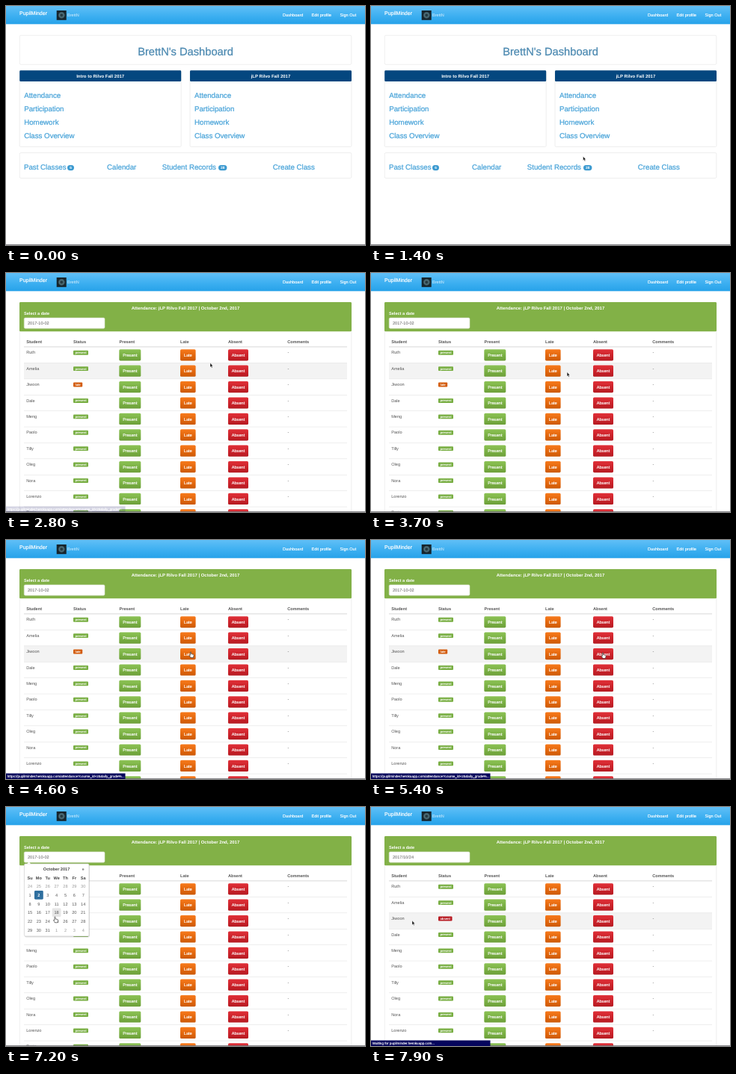
Write an HTML page that moves like this. It is 480x320 px and loops after 8 s.

```html
<!DOCTYPE html>
<html lang="en">
<head>
<meta charset="utf-8">
<title>Class dashboard</title>
<style>
  html, body { margin: 0; width: 100%; height: 100%; overflow: hidden; background: #fff; }
  svg { display: block; width: 100vw; height: 100vh; text-rendering: geometricPrecision;
        font-family: "Liberation Sans", Arial, sans-serif; }
</style>
</head>
<body>
<svg id="stage" viewBox="0 0 480 320"></svg>
<script>
const LOOP = 8000, STEP = 100;
const APP = "PupilMinder", USER = "BrettN", COURSE = "jLP Rilvo Fall 2017";
const HOST = "pupilminder.herokuapp.com";
const STUDENTS = ["Ruth", "Amelia", "Jiwoon", "Dale", "Meng", "Paolo", "Tilly", "Oleg", "Nora", "Lorenzo", "Dario"];
const ROW_TOP = 99, ROW_H = 21.4;
const STATUS_COLORS = { present: "#78ae42", late: "#d35c0d", absent: "#b81b23" };
const BUTTONS = [["Present", 151.3, 29, "green"], ["Late", 233, 20.6, "orange"], ["Absent", 297, 27, "red"]];

// Cursor path: time, x, y of the tip
const PATH = [
  [1000, 300, 326], [1700, 273, 120.6], [3300, 273, 120.6], [4200, 247, 150], [4800, 247, 150],
  [5200, 310, 151], [5600, 310, 151], [6100, 143, 71], [6400, 100, 67], [6600, 100, 67],
  [7200, 65.5, 147.3], [7500, 55, 152.3]
];

const rect = (x, y, w, h, fill, more = "") =>
  `<rect x="${x}" y="${y}" width="${w}" height="${h}" fill="${fill}" ${more}/>`;

const box = (x, y, w, h, fill = "#fff", stroke = "#e2e2e2") =>
  rect(x, y, w, h, fill, `rx="1.6" stroke="${stroke}" stroke-width=".6"`);

// weight thickens the strokes slightly, giving a medium face
function text(str, x, y, size, fill, { anchor = "start", bold = false, weight = 0, more = "" } = {}) {
  return `<text x="${x}" y="${y}" font-size="${size}" fill="${fill}" text-anchor="${anchor}"
    ${bold ? 'font-weight="bold"' : ""} ${weight ? `stroke="${fill}" stroke-width="${weight}"` : ""} ${more}>${str}</text>`;
}

const gradient = (id, ...colors) =>
  `<linearGradient id="${id}" x2="0" y2="1">${colors.map((c, i) =>
    `<stop offset="${[0, .6, 1][i]}" stop-color="${c}"/>`).join("")}</linearGradient>`;

const DEFS = "<defs>" +
  gradient("nav", "#60bff7", "#3aaef0", "#27a2e9") +
  gradient("green", "#8cc255", "#78ae42", "#6d9f3a") +
  gradient("orange", "#f77a1c", "#e0650c", "#cc5a08") +
  gradient("red", "#e03038", "#c92129", "#b51b22") +
  `<radialGradient id="photo"><stop offset=".2" stop-color="#23363d"/><stop offset=".6" stop-color="#52747e"/>
   <stop offset="1" stop-color="#16242b"/></radialGradient></defs>`;

function navbar() {
  const item = (str, x) => text(str, x, 14.2, 5.6, "#fff", { weight: .15 });
  return rect(0, 0, 480, 24.3, "url(#nav)") +
    text(APP, 18, 12.2, 7, "#fff", { weight: .2 }) +
    rect(67.7, 6, 13, 12.8, "#16242b") + `<circle cx="74.3" cy="12.3" r="5" fill="url(#photo)"/>` +
    text(USER, 82, 14.2, 5.6, "#d9effc") +
    item("Dashboard", 370) + item("Edit profile", 408.5) + item("Sign Out", 446.5);
}

function dashboard(linkHovered) {
  const link = (str, x, y, hot) => text(str, x, y, 9.7, hot ? "#17659c" : "#46a2d8",
    { weight: .22, more: hot ? 'text-decoration="underline"' : "" });
  const badge = (n, x, w) => rect(x, 213, w, 7.2, "#3c9ad0", 'rx="3.6"') +
    text(n, x + w / 2, 218.4, 4.8, "#fff", { anchor: "middle", bold: true });
  const panel = (x, title, hot) => box(x, 86.5, 216, 102) +
    rect(x, 86.3, 216, 14.8, "#04477f", 'rx="1.4"') +
    text(title, x + 108, 96, 6, "#fff", { anchor: "middle", bold: true }) +
    ["Attendance", "Participation", "Homework", "Class Overview"].map((s, i) =>
      link(s, x + 6, 123.3 + 18 * i, hot && i === 0)).join("");

  return box(18.3, 39.3, 443.5, 39) +
    text(`${USER}'s Dashboard`, 240, 66, 14.7, "#4a88b0", { anchor: "middle", weight: .25 }) +
    panel(18.2, "Intro to Rilvo Fall 2017", false) + panel(246, COURSE, linkHovered) +
    box(18.3, 196.5, 443.5, 34) +
    link("Past Classes", 24, 219.3) + badge(6, 82, 9) + link("Calendar", 135, 219.3) +
    link("Student Records", 208.8, 219.3) + badge(38, 284, 11.4) + link("Create Class", 356.8, 219.3);
}

function studentRow(name, i, status, hovered) {
  const top = ROW_TOP + ROW_H * i, base = top + 9.3;
  const badgeWidth = { present: 20, late: 12.2, absent: 18.5 }[status];
  return rect(24, top, 432, ROW_H, hovered ? "#f3f3f3" : "#fff") + rect(24, top - .2, 432, .5, "#dcdcdc") +
    text(name, 27.2, base, 5.6, "#555") +
    rect(90, top + 4.8, badgeWidth, 5.9, STATUS_COLORS[status], 'rx="1"') +
    text(status, 90 + badgeWidth / 2, top + 9.1, 4.2, "#fff", { anchor: "middle", bold: true }) +
    BUTTONS.map(([label, x, w, color]) =>
      rect(x, top + 3.2, w, 15.2, `url(#${color})`, 'rx="1.6"') +
      text(label, x + w / 2, top + 12.9, 5.6, "#fff", { anchor: "middle", weight: .15 })).join("") +
    text("-", 376.5, base, 5.6, "#555");
}

function attendance(date, status, hoverRow) {
  const heads = [["Student", 27.2], ["Status", 90], ["Present", 151.5], ["Late", 233], ["Absent", 297], ["Comments", 376.3]];
  return box(18.3, 39.3, 443.5, 300) +
    rect(18, 39, 444, 39.3, "#82b147", 'rx="1.4"') +
    text(`Attendance: ${COURSE} | October 2nd, 2017`, 240, 49, 5.95, "#fff", { anchor: "middle", bold: true }) +
    text("Select a date", 24, 56.2, 5.6, "#fff", { bold: true }) +
    box(24.2, 60, 107.8, 14.2, "#fff", "#d5ddca") + text(date, 29, 69.2, 5.6, "#555") +
    heads.map(([s, x]) => text(s, x, 93.5, 5.6, "#555", { bold: true })).join("") +
    STUDENTS.map((name, i) => studentRow(name, i, i === 2 ? status : "present", i === hoverRow)).join("") +
    rect(24, 98.4, 432, .8, "#dcdcdc");
}

function calendar(hoverDay) {
  const mid = { anchor: "middle" }, strong = { anchor: "middle", bold: true };
  const colX = c => 32 + 11.87 * c, rowY = r => 106.2 + 11.7 * r;
  let out = rect(25, 77, 87, 97.6, "#000", 'rx="2" opacity=".12"') + box(24.4, 76, 86.6, 97, "#fff", "#c4c4c4") +
    `<path d="M28 76.2l2.6-2.8 2.6 2.8z" fill="#fff"/>` +
    text("October 2017", 67.6, 85.2, 5.6, "#444", strong) + text("»", 103, 85.2, 5.6, "#444", strong) +
    ["Su", "Mo", "Tu", "We", "Th", "Fr", "Sa"].map((d, c) => text(d, colX(c), 96.6, 5.6, "#444", strong)).join("");
  for (let i = 0; i < 42; i++) {
    const date = new Date(2017, 8, 24 + i), day = date.getDate(), inMonth = date.getMonth() === 9;
    const x = colX(i % 7), y = rowY(Math.floor(i / 7));
    const selected = inMonth && day === 2, hot = inMonth && day === hoverDay;
    if (selected || hot) out += rect(x - 5.9, y - 5.8, 11.8, 11.6, selected ? "#2f6f9f" : "#e6e6e6", 'rx="1.4"');
    out += text(day, x, y + 2, 5.6, selected ? "#fff" : inMonth ? "#555" : "#999", selected ? strong : mid);
  }
  return out;
}

function statusBar(str, opacity) {
  return `<g opacity="${opacity}">` + rect(0, 312.5, 159.5, 7.5, "#05055c") +
    text(str, 1.8, 317.7, 4.6, "#fff", { weight: .15 }) + "</g>";
}

function cursor({ x, y }, hand) {
  const shape = hand
    ? "M-.6 0q.7-.6 1.2.2v2.4l3 .7q.7.3.5 1.2l-.7 3H.1L-2 4.600q0-.9.8-.6l.6.5z"
    : "M0 0v5.400l1.200-1.100 .9 2 .9-.4-.9-1.900h1.600z";
  return `<path transform="translate(${x} ${y})" d="${shape}" fill="${hand ? "#fff" : "#111"}"
    stroke="${hand ? "#222" : "#fff"}" stroke-width="${hand ? .6 : .35}" stroke-linejoin="round"/>`;
}

function cursorAt(t) {
  const next = PATH.findIndex(k => k[0] > t);
  if (next <= 0) {
    const [, x, y] = next ? PATH[PATH.length - 1] : PATH[0];
    return { x, y };
  }
  const [t0, x0, y0] = PATH[next - 1], [t1, x1, y1] = PATH[next];
  const p = (t - t0) / (t1 - t0), e = p * p * (3 - 2 * p);
  return { x: x0 + (x1 - x0) * e, y: y0 + (y1 - y0) * e };
}

function statusAt(t) {
  const page = `https://${HOST}/attendance?course_id=2`;
  const grade = page + "&amp;daily_grade%...";
  if (t >= 1700 && t < 2800) return statusBar(page, 1);
  if (t >= 2800 && t < 3000) return statusBar(grade, t < 2900 ? .16 : .07);
  if (t >= 4200 && t < 6200) return statusBar(grade, 1);
  if (t >= 6200 && t < 6400) return statusBar(grade, t < 6300 ? .5 : .16);
  if (t >= 7700) return statusBar(`Waiting for ${HOST}...`, 1);
  return "";
}

function scene(t) {
  const pos = cursorAt(t), onDashboard = t < 2800, picking = t >= 6500 && t < 7600;
  let hand, page;
  if (onDashboard) {
    hand = pos.x > 252 && pos.x < 302 && pos.y > 114 && pos.y < 126;
    page = dashboard(hand);
  } else {
    const row = picking ? -1 : Math.floor((pos.y - ROW_TOP) / ROW_H);
    const offset = pos.y - ROW_TOP - row * ROW_H;
    hand = picking ? pos.y > 100 : row >= 0 && offset > 3.2 && offset < 18.4 &&
      BUTTONS.some(([, x, w]) => pos.x > x && pos.x < x + w);
    page = attendance(t < 7600 ? "2017-10-02" : "2017/10/24", t < 5600 ? "late" : "absent", row);
    if (picking) page += calendar(pos.y < 100 ? 0 : t < 7400 ? 18 : 24);
  }
  return DEFS + rect(0, 0, 480, 320, "#fff") + page + navbar() +
    rect(0, 319.2, 480, .8, "#6e6e74") + statusAt(t) + cursor(pos, hand);
}

const stage = document.getElementById("stage");
const start = performance.now();
let shown = -1;
function draw() {
  const t = Math.floor(((performance.now() - start) % LOOP) / STEP) * STEP;
  if (t !== shown) stage.innerHTML = scene(shown = t);
  requestAnimationFrame(draw);
}
draw();
</script>
</body>
</html>
```
